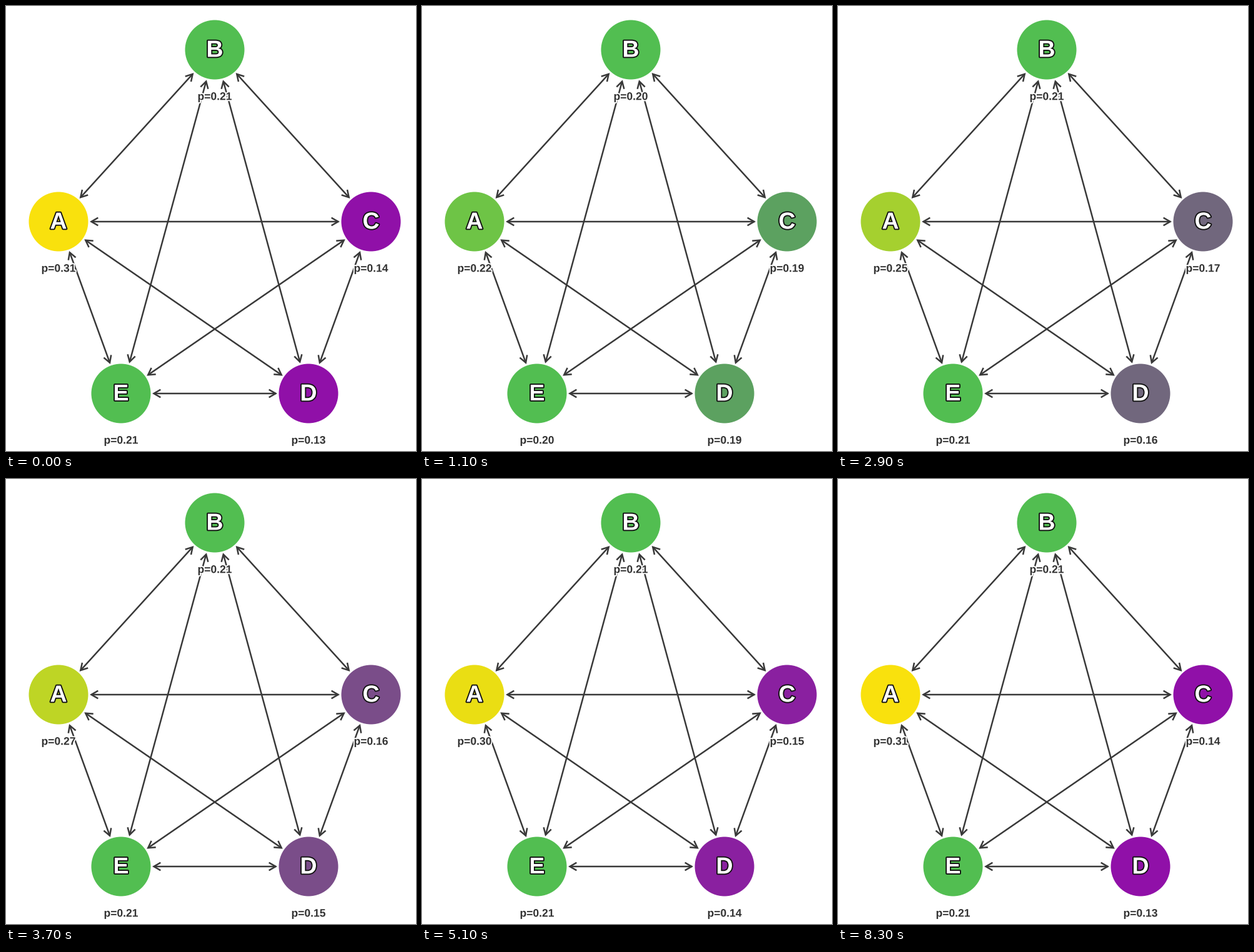
A matplotlib script for the animation above (8400 ms loop, 656x712 px).

```python
from itertools import combinations

import matplotlib.pyplot as plt
import numpy as np
from matplotlib.animation import FuncAnimation
from matplotlib.patches import Circle, PathPatch
from matplotlib.path import Path
from matplotlib.textpath import TextPath

W, H, DPI = 656, 712, 100
PX = 72 / DPI  # one pixel in points
FRAMES, STEP_MS = 84, 100
RAMP_START, RAMP_LEN = 2, 54

RADIUS, GAP = 47.5, 52.5
HEAD_LEN, HEAD_ANGLE = 12.5, np.radians(30)
INK = "#383838"
FONT = dict(family="Liberation Sans", weight="bold")
LETTER_SIZE, LABEL_SIZE = 37.5, 17.5
LABEL_EMS = 3.141  # advance width of "p=0.00"

GREEN = np.array([82, 190, 81]) / 255
YELLOW = np.array([249, 225, 13]) / 255
PURPLE = np.array([144, 16, 168]) / 255

# name: (x, y, final probability, final colour)
NODES = {
    "A": (84, 345, 0.309, YELLOW),
    "B": (334, 70, 0.211, GREEN),
    "C": (584, 345, 0.140, PURPLE),
    "D": (484, 620, 0.129, PURPLE),
    "E": (184, 620, 0.211, GREEN),
}

fig = plt.figure(figsize=(W / DPI, H / DPI), dpi=DPI, facecolor="white")
ax = fig.add_axes([0, 0, 1, 1])
ax.set_xlim(0, W)
ax.set_ylim(H, 0)
ax.axis("off")


def text_path(text, size, x, y, ems):
    """Outline of text centred on x with its baseline at y."""
    p = TextPath((0, 0), text, size=size, prop=FONT)
    return Path(p.vertices * [1, -1] + [x - ems * size / 2, y], p.codes)


def stroke(points):
    x, y = np.transpose(points)
    ax.plot(x, y, color=INK, lw=2.5 * PX, solid_capstyle="butt",
            solid_joinstyle="miter", zorder=1)


def turn(v, angle):
    c, s = np.cos(angle), np.sin(angle)
    return np.array([c * v[0] - s * v[1], s * v[0] + c * v[1]])


def double_arrow(a, b):
    a, b = np.array(a, float), np.array(b, float)
    d = (b - a) / np.hypot(*(b - a))
    start, end = a + GAP * d, b - GAP * d
    stroke([start, end])
    for tip, back in ((start, d), (end, -d)):
        barbs = [tip + HEAD_LEN * turn(back, k * HEAD_ANGLE) for k in (-1, 1)]
        stroke([barbs[0], tip, barbs[1]])


def outlined(path, fill, edge, width, z):
    """Text with an outline behind its fill."""
    back = PathPatch(path, fc=edge, ec=edge, lw=width * PX,
                     joinstyle="round", zorder=z)
    front = PathPatch(path, fc=fill, ec="none", lw=0, zorder=z + 0.1)
    ax.add_patch(back)
    ax.add_patch(front)
    return back, front


def label_path(x, y, p):
    return text_path(f"p={p:.2f}", LABEL_SIZE, x, y + 80.3, LABEL_EMS)


for m, n in combinations(NODES, 2):
    double_arrow(NODES[m][:2], NODES[n][:2])

discs, labels = {}, {}
for name, (x, y, p, color) in NODES.items():
    discs[name] = ax.add_patch(Circle((x, y), RADIUS, fc=color, lw=0, zorder=2))
    ems = 0.667 if name == "E" else 0.722
    letter = text_path(name, LETTER_SIZE, x, y + 11.4, ems)
    outlined(letter, "white", "#111111", 3.75, 3)
    labels[name] = outlined(label_path(x, y, p), "#333333", "white", 3.75, 4)


def draw(i):
    # The loop opens on the settled state, then restarts from equal shares.
    s = 1.0 if i == 0 else np.clip((i - RAMP_START) / RAMP_LEN, 0, 1)
    for name, (x, y, p, color) in NODES.items():
        discs[name].set_facecolor(GREEN + (color - GREEN) * s)
        path = label_path(x, y, 0.2 + (p - 0.2) * s)
        for part in labels[name]:
            part.set_path(path)
    return []


anim = FuncAnimation(fig, draw, frames=FRAMES, interval=STEP_MS,
                     init_func=lambda: draw(0), repeat=True, repeat_delay=0,
                     blit=False)
plt.show()
```
